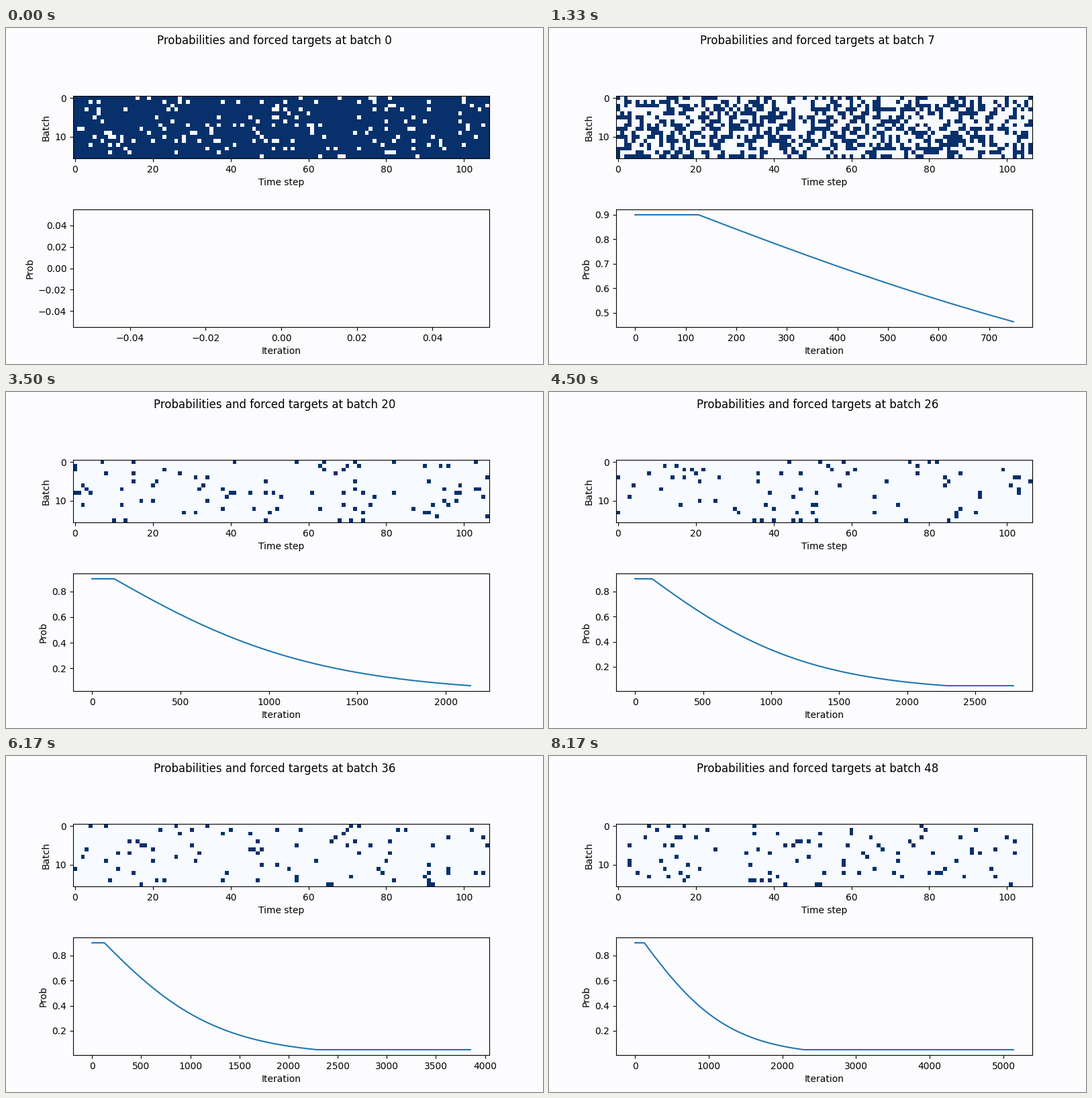
A matplotlib script for the animation above (8340 ms loop, 800 by 500 pixels).

```python
import numpy as np
import matplotlib.pyplot as plt
from matplotlib.animation import FuncAnimation

BATCHES, ROWS, STEPS = 50, 16, 107
LOOP_MS = 8340
PAPER = "#fcfcff"

plt.rcParams.update({
    "font.family": "DejaVu Sans",
    "figure.facecolor": PAPER,
    "axes.facecolor": PAPER,
})


def forcing_prob(i):
    """Inverse sigmoid decay, clipped at both ends."""
    return np.clip(2 / (1 + np.exp(0.0016 * i)), 0.05, 0.9)


# One dice roll per cell, drawn once so every loop looks the same.
rng = np.random.default_rng(7)
rolls = rng.uniform(size=(BATCHES, ROWS, STEPS))


def forced_targets(batch):
    prob = forcing_prob(batch * STEPS + np.arange(STEPS))
    return (rolls[batch] < prob).astype(float)


fig, (ax_map, ax_prob) = plt.subplots(2, 1, figsize=(8, 5), dpi=100)
title = fig.suptitle("")
image = ax_map.imshow(forced_targets(0), cmap="Blues", vmin=0, vmax=1)
ax_map.set(xlabel="Time step", ylabel="Batch")


def draw(batch):
    title.set_text(f"Probabilities and forced targets at batch {batch}")
    image.set_data(forced_targets(batch))
    # The curve holds every step finished before this batch.
    done = np.arange(batch * STEPS)
    ax_prob.clear()
    ax_prob.plot(done, forcing_prob(done), color="#1f77b4")
    ax_prob.set(xlabel="Iteration", ylabel="Prob")
    return title, image


anim = FuncAnimation(fig, draw, frames=BATCHES, interval=LOOP_MS / BATCHES,
                     repeat=True, repeat_delay=0, blit=False)
plt.show()
```
